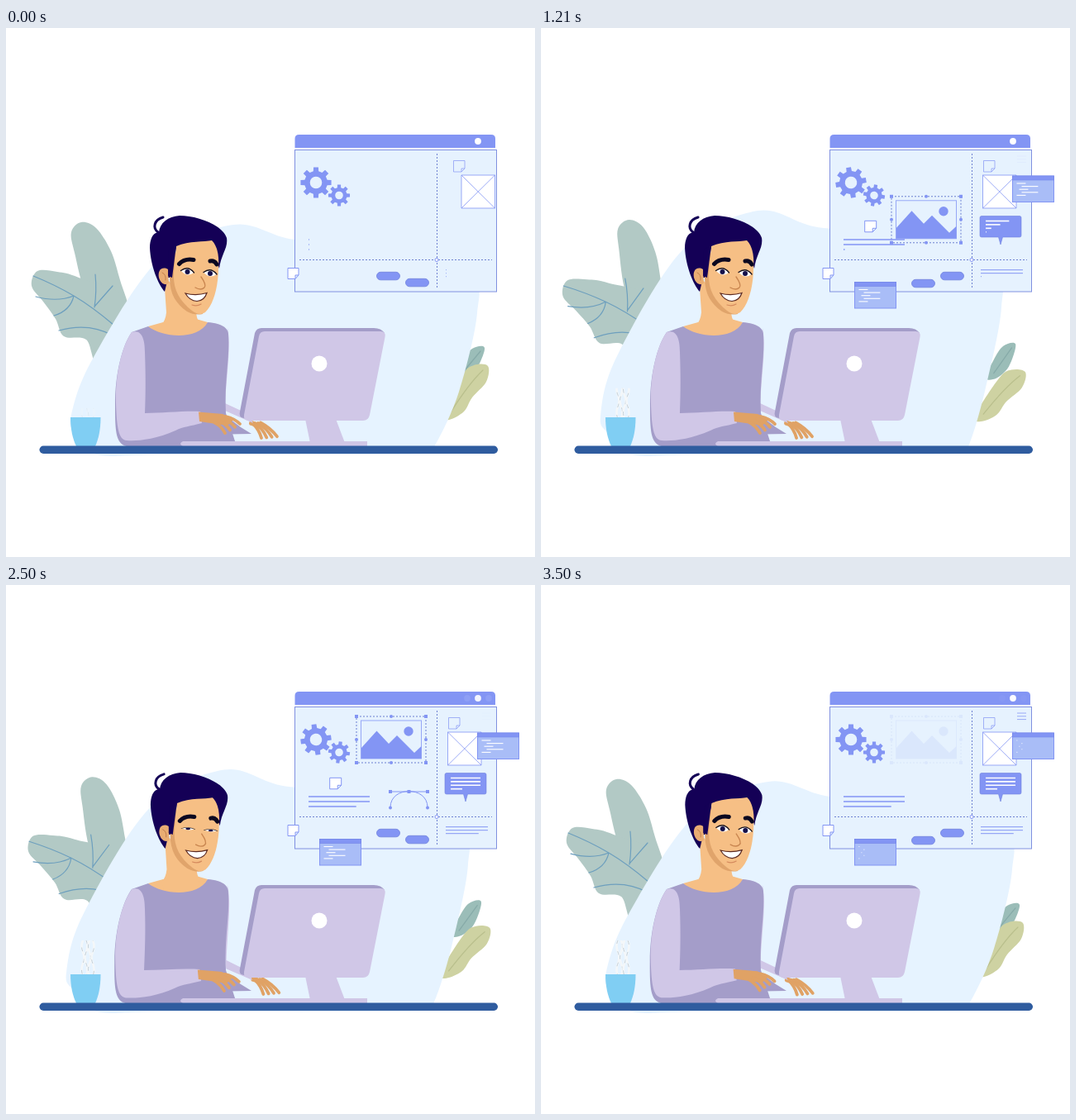
These frames come from a looping animation (640x640 px, 3.57 s). An HTML page:

```html
<!DOCTYPE html>
<html lang="en">
<head>
<meta charset="utf-8">
<title>Designer at work</title>
<style>
  html, body { margin: 0; width: 100%; height: 100%; overflow: hidden; background: #fff; }
  svg { display: block; width: 100vw; height: 100vh; }
  .thin { fill: none; stroke: #8395f4; }
  .blue { fill: #8395f4; }
  .white { fill: #fff; stroke: #8395f4; }
  .dash { fill: none; stroke: #6c80d2; stroke-dasharray: 2 2; }
  .leaf { fill: #b2c9c5; }
  .vein { fill: none; stroke: #6d9fbe; stroke-width: 1.2; stroke-linecap: round; }
  .light { fill: #d0c7e7; }
  .dark { fill: #a49dc9; }
  .skin { fill: #f6bf85; }
  .hand { fill: none; stroke: #e0a265; stroke-width: 3.8; stroke-linecap: round; }
  .hair { fill: #140056; }
  .line { fill: none; stroke-linecap: round; }
</style>
</head>
<body>
<svg viewBox="0 0 640 640">
  <defs><clipPath id="steamClip"><rect id="steamBox" x="85" y="430" width="28" height="42"/></clipPath></defs>

  <g id="teal"><path class="vein" style="stroke:#86aaa8" d="M574 391L550 420"/></g>
  <g id="olive"><path class="vein" style="stroke:#b9bf8c" d="M577 414Q560 430 538 465"/></g>
  <g id="lobe"></g>
  <g id="fan"><path class="vein" d="M33 300Q60 311 82 324T130 359M36 325Q62 332 82 324M58 348Q78 342 82 324M108 298Q110 318 107 338M129 312L107 337M64 366Q100 356 129 372"/></g>
  <path id="blob" fill="#e6f3ff"/>

  <g id="panel">
    <path class="blue" d="M349.5 145V134q0-5 5-5H587q5 0 5 5v11z"/>
    <rect x="349.5" y="147.500" width="244" height="171.500" fill="#e6f2fe" stroke="#8090e0"/>
    <g fill="#fff">
      <circle class="outer" cx="558" cy="137" r="3.900"/>
      <circle id="middle" cx="571" cy="137" r="3.900"/>
      <circle class="outer" cx="584" cy="137" r="3.900"/>
    </g>
    <path class="dash" d="M521.500 152V314M355 280.500H588"/>
    <circle class="white" cx="521" cy="280.500" r="2"/>
    <path class="white" d="M341 290.500h13v8.500l-4 4.500h-9zM354 299h-4v4.500"/>
    <path id="gearA" class="blue" fill-rule="evenodd"/>
    <path id="gearB" class="blue" fill-rule="evenodd"/>
    <path id="note" class="thin" stroke-opacity=".7" d="M0 160.500h13.500v9.500l-4 4h-9.500zM13.500 170h-4v4"/>
    <path id="crossBox" class="white" stroke-opacity=".8" d="M0 178h40.500v40h-40.500zl40.500 40m0-40l-40.500 40"/>
    <path id="memo" class="white" d="M-14-13.500H0v9L-4.500 0H-14zM0-4.500h-4.500V0"/>
    <g id="picture">
      <path class="dash" d="M424 0h84v56h-84z"/>
      <rect class="thin" x="429.500" y="5" width="73" height="46" stroke-opacity=".8"/>
      <path class="blue" d="M430 38L448.500 17.500L463 33L473 23L494 44L502.500 36V51H430z"/>
      <circle class="blue" cx="487" cy="18" r="5.700"/>
    </g>
    <g id="arch"><path class="thin" d="M465 250h45M465 269c0-26 45-26 45 0"/></g>
    <path id="menu" class="thin" stroke-opacity=".8" d="M576 155h11m-11 3.800h11m-11 3.800h11"/>
    <g id="bubble">
      <path class="blue" stroke="#7082dd" stroke-width=".6" d="M-23-34.500h46q2 0 2 2v21.500q0 2-2 2H2.500L0 0L-2.500-9h-20.500q-2 0-2-2v-21.500q0-2 2-2z"/>
    </g>
    <g class="blue" stroke="#7082dd" stroke-width=".8">
      <rect id="pillA" x="448.500" width="28" height="9.500" rx="4.700"/>
      <rect id="pillB" x="483.500" width="28" height="9.500" rx="4.700"/>
    </g>
  </g>

  <g id="steam" class="line" clip-path="url(#steamClip)"></g>
  <path fill="#80cef3" d="M78 471h36.500C114.500 486 112 497 108 506H85C81 498 78 486 78 471z"/>

  <g id="handR" class="hand"><path stroke-width="6" d="M297 478L307 481"/></g>
  <path id="armR" class="light"/>
  <path class="dark" d="M262 466L284 483L297 491L240 492z"/>
  <path class="skin" d="M172 361L190 356L230 352L244 356L234 382H188z"/>

  <g id="head">
    <path class="skin" d="M191 300L194 344Q193 354 188 359L194 385H226L234 356Q230 352 230 340z"/>
    <path class="hair" d="M192 319C184 310 175 288 174 266C174 252 180 247 185 247C186 236 196 228 210 227C231 227 262 238 267 254C269 266 260 274 258 291L250 268L206 266L201 302H196z"/>
    <path class="line" d="M184 247C177 242 179 232 190 229" stroke="#140056" stroke-width="3"/>
    <path d="M196 292C189 288 183 293 185 302C187 309 192 312 197 309z" fill="#e9ad73"/>
    <path class="line" d="M189 296Q194 298 193 305" stroke="#bd7b4b" stroke-width=".9"/>
    <path d="M203 268L198 302C198 322 206 334 219 343Q228 348 238 346L236 320L210 280z" fill="#e0a46b"/>
    <path class="skin" d="M206 264C222 257 240 259 249 257C256 264 258 276 257 290C257 310 252 334 241 344Q234 349 225 342C209 329 202 316 203 296z"/>
    <path class="hair" d="M206 263L201 302L196 300L197 268z"/>
    <path class="line" stroke="#0b0820" stroke-width="5" d="M209.500 285.500Q216 278.500 227 280.500M247 282Q252 280.500 255 286"/>
    <path class="line" d="M236 301Q243 311 240 314Q236 318 229 314" stroke="#c98650" stroke-width="1.400"/>
    <path d="M217 321Q230 324.500 243 320.500Q240 330 231 330.500Q222 330 217 321z" fill="#fff" stroke="#5b2a22" stroke-width="1.200"/>
    <path class="line" d="M225 335Q231 337 236 334" stroke="#d58b5e" stroke-width="1.200"/>
  </g>

  <path id="torso" class="dark"/>
  <path id="sleeve" class="light"/>
  <path class="light" d="M214 500H437V506H214q-6-3 0-6z"/>
  <g id="handL" class="hand"><path stroke="none" fill="#e0a265" d="M233 464.500L262 467L276 473L268 481L234 476z"/></g>

  <path class="light" d="M362 473H399L410 502H368z"/>
  <path class="dark" d="M309 363H445Q454 363 458 369L300 475L288 472Q281 471 283 464L301 369Q303 363 309 363z"/>
  <path class="light" d="M313 367H453Q460 367 458.500 374L440 468Q438.500 475 432 475H293Q287 474 288 468L306 373Q307 367 313 367z"/>
  <circle cx="379" cy="406" r="9.500" fill="#fff"/>
  <rect x="40.500" y="505.500" width="554.500" height="9.500" rx="4.700" fill="#2f5c9f"/>
</svg>
<script>
const LOOP = 3570, FRAME = 71.4, NS = 'http://www.w3.org/2000/svg';
const $ = id => document.getElementById(id);
const set = (el, name, v) => el.setAttribute(name, v);
const clamp = v => Math.max(0, Math.min(1, v));
const ramp = (t, a, b) => clamp((t - a) / (b - a));
const ease = p => (1 - Math.cos(Math.PI * p)) / 2;
const step = (t, a, b) => ease(ramp(t, a, b));
const swing = (t, period, peak = 0) => Math.cos(2 * Math.PI * (t - peak) / period);

function add(parent, tag, attrs) {
  const el = document.createElementNS(NS, tag);
  for (const k in attrs) set(el, k, attrs[k]);
  return parent.appendChild(el);
}

// Closed smooth curve through a few points
function outline(points) {
  const n = points.length, p = i => points[(i + n) % n];
  let d = 'M' + p(0);
  for (let i = 0; i < n; i++) {
    const [a, b, c, e] = [-1, 0, 1, 2].map(j => p(i + j));
    d += 'C' + b.map((v, j) => v + (c[j] - a[j]) / 6) + ' ' +
      c.map((v, j) => v - (e[j] - b[j]) / 6) + ' ' + c;
  }
  return d + 'z';
}
const points = text => text.split(',').map(s => s.trim().split(' ').map(Number));

// Plants: each leaf turns rigidly around its own root
function leaf(id, color, text, turn) {
  const path = add($(id), 'path', { fill: color, d: outline(points(text)) });
  $(id).prepend(path);
  return k => set($(id), 'transform', `rotate(${turn[0] * k} ${turn[1]} ${turn[2]})`);
}
const plants = [
  leaf('fan', '#b2c9c5', '112 404,97 377,70 373,60 352,45 331,31 312,38 294,62 295,88 302,145 330', [-7, 158, 367]),
  leaf('lobe', '#b2c9c5', '98 325,83 272,79 247,91 235,109 242,127 270,138 305,150 350,130 370', [8.6, 125, 368]),
  leaf('teal', '#9bbdb8', '579 387,564 388,551 404,540 425,553 426,569 413', [-5.7, 519, 448]),
  leaf('olive', '#ced2a2', '583 409,566 408,552 420,528 468,536 474,554 464,564 447,581 428', [8, 516, 440])
];

// The backdrop leans left and stretches upward with height
const backdrop = points('84 490,79 468,105 400,185 280,275 238,349 256,460 262,560 300,570 345,548 440,519 505,505 515,200 516,110 516');
function lean(k) {
  return backdrop.map(([x, y]) => {
    const h = Math.max(0, 515 - y);
    return [x - 17 * k * Math.min(1, h / 90), y - 22 * k * (h / 277) ** 2];
  });
}

function gear(r, base, hole, teeth) {
  const pts = [], unit = Math.PI * 2 / teeth;
  for (let i = 0; i < teeth; i++)
    for (const [off, rad] of [[-.29, base], [-.2, r], [.2, r], [.29, base]]) {
      const a = (i + off) * unit - Math.PI / 2;
      pts.push([rad * Math.cos(a), rad * Math.sin(a)]);
    }
  return `M${pts.join('L')}zM${hole} 0A${hole} ${hole} 0 1 0 ${-hole} 0A${hole} ${hole} 0 1 0 ${hole} 0z`;
}
set($('gearA'), 'd', gear(18.8, 14, 7.3, 8));
set($('gearB'), 'd', gear(13.2, 9.6, 4.8, 8));

// Handles: square at the corners, round between
function handle(parent, x, y, round) {
  add(parent, 'rect', { class: 'blue', x: x - 2, y: y - 2, width: 4, height: 4, rx: round ? 2 : 0 });
}
for (let i = 0; i < 3; i++) {
  for (let j = 0; j < 3; j++)
    if (i !== 1 || j !== 1) handle($('picture'), 424 + 42 * i, 28 * j, (i + j) % 2);
  handle($('arch'), 465 + 22.5 * i, 250);
  if (i !== 1) handle($('arch'), 465 + 22.5 * i, 269.5, true);
}

// Four fingers fanned out from the knuckles to the tips
function fingers(id, [x, y], [dx, dy], [tx, ty], [sx, sy]) {
  for (let i = 0; i < 4; i++) {
    const a = [x + dx * i, y + dy * i], b = [tx + sx * i, ty + sy * i];
    add($(id), 'path', { d: `M${a}Q${(a[0] + b[0]) / 2 + 2} ${(a[1] + b[1]) / 2 - 2} ${b}` });
  }
}
fingers('handL', [266, 470], [-4.5, 2.5], [283, 479], [-6, 3.7]);
fingers('handR', [299, 479], [3, -.5], [309, 496], [6.3, -.6]);

const eyes = [[219.5, 295], [247, 297]].map(([x, y]) => {
  const g = add($('head'), 'g', {});
  add(g, 'path', { fill: '#fff', d: 'M-7.500-1Q1-8 7.500 1Q0 7-7.500-1z' });
  add(g, 'circle', { fill: '#15104a', cx: 0, cy: 0, r: 3 });
  add(g, 'path', { class: 'line', stroke: '#15101c', 'stroke-width': 1.3, d: 'M-8-1.500Q1-8 8 1' });
  return lid => set(g, 'transform', `translate(${x} ${y}) scale(1 ${lid})`);
});

// Text strokes that grow from their left end
const grown = [];
function grow(parent, x, y, w, color, width, amount) {
  const el = add(parent, 'path', { stroke: color, 'stroke-width': width });
  grown.push(t => set(el, 'd', `M${x} ${y}h${Math.max(.8, w * amount(t))}`));
}
for (let i = 0; i < 3; i++) {
  const amount = t => ramp(t, i * 600, i * 600 + 530);
  const part = i < 2 ? 1 : .78;
  grow($('panel'), 366, 256 + i * 6, 74 * part, '#8395f4', 1.3, amount);
  grow($('panel'), 532, 292.7 + i * 4, 51 * part, '#8395f4', 1, amount);
}
for (let i = 0; i < 4; i++)
  grow($('bubble'), -18, -28.5 + i * 4.4, i < 3 ? 36 : 14, '#fff', 1.6,
    t => ramp(t, 820 + i * 150, 1320 + i * 150));

const windows = [[570.5, 179], [379.5, 307.5]].map(([x, y]) => {
  const g = add($('panel'), 'g', { transform: `translate(${x} ${y})` });
  add(g, 'rect', { width: 50, height: 31.5, fill: '#a9bdf7', stroke: '#8395f4' });
  add(g, 'rect', { width: 50, height: 5, fill: '#8395f4', stroke: '#7486e6', 'stroke-width': .6 });
  [5, 11, 8, 11, 5].forEach((dx, i) =>
    grow(g, dx, 9 + i * 3.6, i % 2 ? 20 : 11, '#fff', 1.1,
      t => step(t, 380, 1260) * (1 - step(t, 2620, 3520))));
  return g;
});

const wisps = [0, 1, 2, 3].map(i => {
  const d = `M${93 + 4 * i} 473q${i % 2 ? 3 : -3}-8 0-15t0-14t0-14`;
  add($('steam'), 'path', { d, stroke: '#f4f7f9', 'stroke-width': 2.6 });
  return add($('steam'), 'path', { d, stroke: '#bccad5', 'stroke-width': .9, 'stroke-dasharray': '4 10' });
});

// k goes from the near pose (0) to the far pose (1)
function drawBody(k) {
  const wx = 235 - 9 * k, wy = 464 + 10 * k, left = 132 - 8 * k;
  set($('torso'), 'd', `M152 368L172 361C190 375 232 378 244 356C256 357 ${268 - 4 * k} 360 ${269 - 2 * k} 370
    C271 400 264 425 266 466L279 506H${146 - 14 * k}C${left - 3 * k} 503 ${left - 2 * k} 485 ${left} 455
    C${left + 3 * k} 420 140 385 152 368z`);
  set($('sleeve'), 'd', `M${152 + 3 * k} 368C164 364 168 376 168 392C169 420 ${169 - 9 * k} 440 ${168 - 10 * k} 466
    C190 466 215 ${463 + 4 * k} ${wx} ${wy}l2 14C${222 - 10 * k} ${482 + 8 * k} 215 ${482 + 8 * k} ${205 - 9 * k} ${487 + 7 * k}
    C180 ${498 + 4 * k} 158 ${500 + 4 * k} ${146 - 10 * k} ${499 + 4 * k}C${136 - 12 * k} ${498 + 4 * k} ${134 - 11 * k} 483 ${left + 1} 454
    C${left + 3 * k} 420 140 385 ${152 + 3 * k} 368z`);
  set($('armR'), 'd', `M${268 - 2 * k} 363C${272 + 7 * k} ${385 - 11 * k} ${268 + 8 * k} ${410 - 10 * k} ${265 + 17 * k} 454
    L${293 - 2 * k} 467L${299 - 10 * k} 478L${265 + 13 * k} ${463 + 12 * k}C${264 - 4 * k} 435 ${267 - 3 * k} 400 ${268 - 2 * k} 363z`);
  set($('head'), 'transform', `rotate(${3.2 * k} 215 435)`);
  set($('handL'), 'transform', `translate(${-12 * k} ${9.5 * k})`);
  set($('handR'), 'transform', `translate(${25 * k} ${-10.5 * k})`);
}

function drawPanel(t, pose) {
  document.querySelectorAll('.outer').forEach(e => set(e, 'opacity', pose));
  set($('middle'), 'opacity', 1 - pose);
  const slide = ramp(t, 0, 800);
  set($('crossBox'), 'transform', `translate(${551 - 16.5 * slide})`);
  set($('note'), 'transform', `translate(${541.5 - 6 * slide})`);

  set($('picture'), 'opacity', ramp(t, 0, 500) * (1 - ramp(t, 3100, 3550)));
  set($('picture'), 'transform', `translate(0 ${219 - 60 * step(t, 808, 2016)})`);
  set($('arch'), 'opacity', ramp(t, 1250, 1650) * (1 - ramp(t, 3100, 3480)));
  set($('menu'), 'opacity', step(t, 600, 1700) * ((1 + swing(t, LOOP / 2)) / 2) ** 1.5);
  const memo = step(t, 60, 570) * (1 - step(t, 2930, 3450));
  set($('memo'), 'transform', `translate(405.7 246.8) scale(${memo})`);
  set($('bubble'), 'transform', `translate(556 262) scale(${step(t, 0, 600)})`);
  set($('bubble'), 'opacity', ramp(t, 50, 680));
  set($('pillA'), 'y', 295.3 + 9 * clamp(.5 + .8 * swing(t, 2430, 1288)));
  set($('pillB'), 'y', 295.3 + 8 * clamp(.5 + .8 * swing(t, 2430, -190)));
  windows.forEach(g => set(g, 'opacity', ramp(t, 60, 380)));
  grown.forEach(draw => draw(t));
}

function draw(t) {
  const slow = ease(2 * t / LOOP), pose = ease(6 * t / LOOP);
  plants.forEach(turn => turn(slow));
  set($('blob'), 'd', outline(lean(slow)));
  set($('gearA'), 'transform', `translate(375 187) rotate(${-12 * slow})`);
  set($('gearB'), 'transform', `translate(403 202.5) rotate(${12 * slow})`);
  drawBody(pose);
  drawPanel(t, pose);

  const lid = 1 - .62 * clamp(1 - Math.abs(t - 2500) / 130);
  eyes.forEach(close => close(lid));

  set($('steamBox'), 'y', 460 - 30 * ramp(t, 200, 1450));
  set($('steam'), 'opacity', .25 + .75 * ramp(t, 0, 700));
  wisps.forEach((w, i) => set(w, 'stroke-dashoffset', i * 5 - 84 * t / LOOP));
}

const start = performance.now();
function tick() {
  const t = (performance.now() - start) % LOOP;
  draw(Math.min(49, Math.floor((t + 6) / FRAME)) * FRAME);
  requestAnimationFrame(tick);
}
tick();
</script>
</body>
</html>
```
